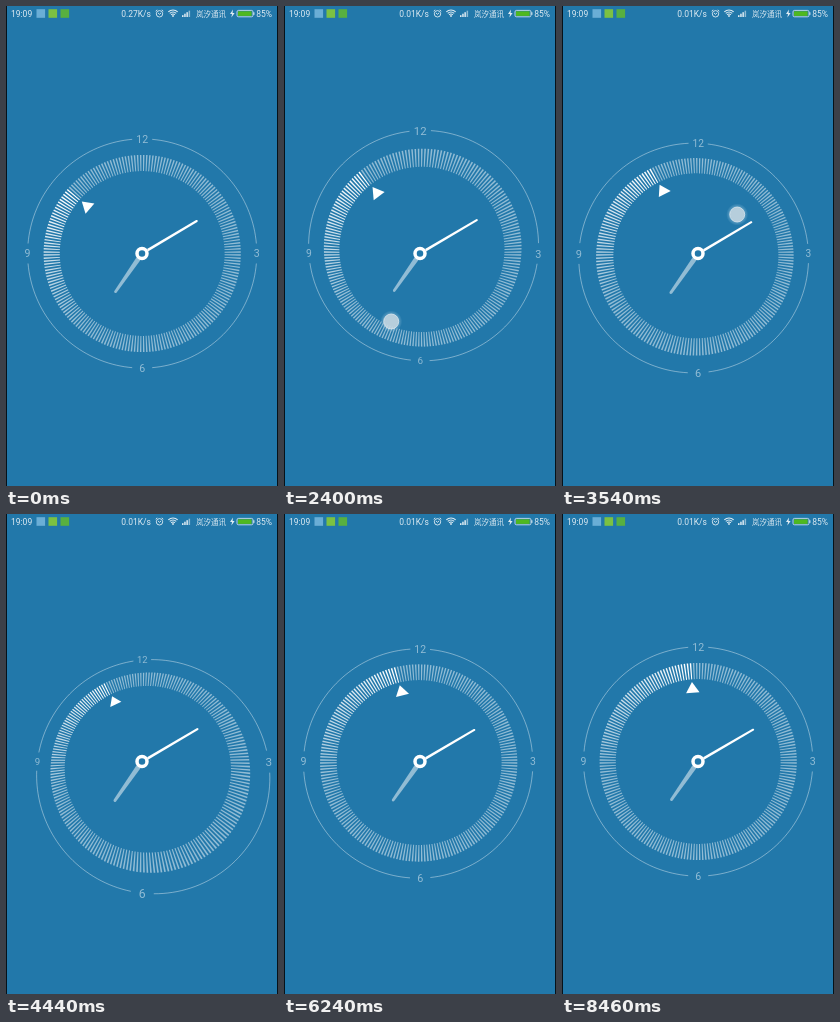
An HTML page with a canvas for the animation above (8520 ms loop, 272 px wide and 480 px high).

```html
<!DOCTYPE html>
<html lang="zh">
<head>
<meta charset="utf-8">
<title>Tilting clock</title>
<style>
  html, body { margin: 0; width: 100%; height: 100%; overflow: hidden; background: #2278aa; }
  canvas { display: block; width: 272px; height: 480px; }
</style>
</head>
<body>
<canvas id="stage"></canvas>
<script>
const W = 272, H = 480, LOOP = 8520, STEP = 60;
const CX = 136.2, CY = 247.5, R = 135, RAD = Math.PI / 180;
const BG = '#2278aa', LIGHT = '#fff', DIM = 'rgba(255,255,255,.5)';
const TILT = 8.8e-6;

const canvas = document.getElementById('stage');
const ctx = canvas.getContext('2d');
const dpr = window.devicePixelRatio || 1;
canvas.width = W * dpr;
canvas.height = H * dpr;
ctx.scale(dpr, dpr);

// [ms, degrees] of the second marker
const sweep = [[0, -49.3], [2400, -35.6], [3540, -29.3], [4440, -24.8],
  [5220, -20.5], [6240, -15], [LOOP, -4.2]];

// Finger paths: [ms, x, y] from the dial centre; released at the last point
const drags = [
  [[1950, -42, 52], [2400, -29, 68], [2900, 36, 20], [3260, 50, -75],
   [3540, 39, -39], [3900, 8, -70], [4440, -93, -128]],
  [[5100, -28, 36], [5220, -28, 34], [5500, -5, -105], [5750, 55, -55]]
];

function track(keys, t) {
  let i = 1;
  while (i < keys.length - 1 && t > keys[i][0]) i++;
  const a = keys[i - 1], b = keys[i];
  const p = Math.min(1, Math.max(0, (t - a[0]) / (b[0] - a[0])));
  return a.slice(1).map((v, k) => v + (b[k + 1] - v) * p);
}

// Damped swing back to rest, one second long
function spring(p) {
  const f = 0.571429;
  return p >= 1 ? 0 : -Math.pow(2, -2 * p) * Math.sin((p - f / 4) * 2 * Math.PI / f);
}

function pose(t) {
  let x = 0, y = 0, finger = null;
  for (const d of drags) {
    const end = d[d.length - 1][0];
    if (t < d[0][0]) continue;
    [x, y] = track(d, t);
    finger = t < end ? [CX + x, CY + y] : null;
    if (t >= end) {
      const k = spring((t - end) / 1000);
      x *= k;
      y *= k;
    }
  }
  return { kx: -x * TILT, ky: -y * TILT, finger };
}

let view;
function project(x, y) {
  const s = 1 / (1 - view.kx * x - view.ky * y);
  return [CX + x * s, CY + y * s, s];
}

// Point at an angle clockwise from twelve, with a sideways offset
function polar(deg, r, side = 0) {
  const s = Math.sin(deg * RAD), c = Math.cos(deg * RAD);
  return project(r * s + side * c, -r * c + side * s);
}

function trace(points) {
  ctx.beginPath();
  points.forEach(([x, y], i) => i ? ctx.lineTo(x, y) : ctx.moveTo(x, y));
}

function fill(points, color) {
  trace(points);
  ctx.closePath();
  ctx.fillStyle = color;
  ctx.fill();
}

function drawRim() {
  const r = 114.6;
  ctx.strokeStyle = DIM;
  ctx.lineWidth = 0.8;
  for (let q = 0; q < 4; q++) {
    const pts = [];
    for (let a = 5; a <= 85; a += 2) pts.push(polar(q * 90 + a, r));
    trace(pts);
    ctx.stroke();
  }
  ctx.fillStyle = DIM;
  ctx.font = '10.6px Roboto, sans-serif';
  ctx.textAlign = 'center';
  ctx.textBaseline = 'alphabetic';
  ['12', '3', '6', '9'].forEach((label, i) => {
    const [x, y, s] = polar(i * 90, r);
    ctx.save();
    ctx.translate(x, y);
    ctx.scale(s, s);
    ctx.fillText(label, 0, 3.9);
    ctx.restore();
  });
}

function drawTicks(sec) {
  const outer = 98.6, inner = 82.4, gap = 0.81;
  for (let i = 0; i < 200; i++) {
    const a = i * 1.8 + 0.9;
    const behind = ((sec - a) % 360 + 360) % 360;
    const alpha = 0.5 + 0.5 * Math.max(0, 1 - behind / 90);
    const ho = outer * 0.9 * RAD - gap, hi = inner * 0.9 * RAD - gap;
    fill([polar(a, outer, -ho), polar(a, outer, ho), polar(a, inner, hi), polar(a, inner, -hi)],
      `rgba(255,255,255,${alpha})`);
  }
}

function drawHand(deg, len, base, tip, color) {
  const pts = [polar(deg, 6.4, -base)];
  for (let a = -90; a <= 90; a += 30) {
    pts.push(polar(deg, len - tip + tip * Math.cos(a * RAD), tip * Math.sin(a * RAD)));
  }
  pts.push(polar(deg, 6.4, base));
  fill(pts, color);
}

function drawDial(sec) {
  drawRim();
  drawTicks(sec);
  fill([polar(sec, 79.7), polar(sec, 68.9, -6.75), polar(sec, 68.9, 6.75)], LIGHT);
  const minute = 54 + (sec + 360) / 60;
  drawHand(180 + 30 + minute / 12, 48, 2.4, 1.4, DIM);
  drawHand(minute, 64.5, 1.3, 1.05, LIGHT);
  ctx.strokeStyle = LIGHT;
  ctx.lineWidth = 3.5;
  disc(CX - 0.2, CY, 5);
  ctx.stroke();
}

function disc(x, y, r) {
  ctx.beginPath();
  ctx.arc(x, y, r, 0, 2 * Math.PI);
}

function drawFinger([x, y]) {
  const glow = ctx.createRadialGradient(x, y, 6, x, y, 11);
  glow.addColorStop(0, 'rgba(190,220,235,.5)');
  glow.addColorStop(1, 'rgba(190,220,235,0)');
  ctx.fillStyle = glow;
  disc(x, y, 11);
  ctx.fill();
  ctx.fillStyle = 'rgba(205,217,226,.75)';
  ctx.strokeStyle = 'rgba(235,242,246,.65)';
  ctx.lineWidth = 1;
  disc(x, y, 7.5);
  ctx.fill();
  ctx.stroke();
}

function label(text, x, align, size = 8.5) {
  ctx.font = `${size}px Roboto, "Noto Sans CJK SC", "Noto Sans CJK", sans-serif`;
  ctx.textAlign = align;
  ctx.fillText(text, x, 10.6);
}

function drawStatus(t) {
  const ink = 'rgba(255,255,255,.85)';
  ctx.fillStyle = ink;
  ctx.textBaseline = 'alphabetic';
  label('19:09', 5, 'left');
  label(t < 600 ? '0.27K/s' : '0.01K/s', 145, 'right');
  label('岚汐通讯', 190, 'left', 7.5);
  label('85%', 266, 'right');

  [['#6aaed6', 30.5], ['#7cc142', 42.5], ['#58b040', 54.5]].forEach(([color, x]) => {
    ctx.fillStyle = color;
    ctx.fillRect(x, 3.2, 8.6, 8.6);
  });

  // alarm
  ctx.strokeStyle = ink;
  ctx.lineWidth = 0.9;
  disc(153.5, 7.8, 3.2);
  ctx.stroke();
  trace([[152, 7], [153.5, 8.3], [155, 7]]);
  ctx.stroke();
  trace([[149.7, 5.2], [151.2, 3.8]]);
  ctx.stroke();
  trace([[155.8, 3.8], [157.3, 5.2]]);
  ctx.stroke();

  // wireless
  ctx.lineWidth = 1.1;
  for (const r of [2.6, 4.6, 6.6]) {
    ctx.beginPath();
    ctx.arc(167, 10.6, r, -135 * RAD, -45 * RAD);
    ctx.stroke();
  }
  ctx.fillStyle = ink;
  disc(167, 10, 0.9);
  ctx.fill();

  // signal
  for (let i = 0; i < 4; i++) {
    ctx.fillStyle = i < 3 ? ink : 'rgba(255,255,255,.5)';
    ctx.fillRect(176 + i * 2.2, 9.2 - i * 1.5, 1.5, 1.8 + i * 1.5);
  }

  // charging battery
  fill([[227, 3.6], [224, 8], [226, 8], [225.4, 11.4], [228.6, 6.9], [226.6, 6.9]], ink);
  ctx.strokeStyle = ink;
  ctx.lineWidth = 0.8;
  ctx.beginPath();
  ctx.roundRect(231, 4.4, 16, 6.4, 1.5);
  ctx.stroke();
  ctx.fillStyle = '#4fb81f';
  ctx.fillRect(232, 5.3, 13.6, 4.6);
  ctx.fillStyle = ink;
  ctx.fillRect(247.4, 6.3, 1, 2.6);
}

function draw(t) {
  view = pose(t);
  ctx.fillStyle = BG;
  ctx.fillRect(0, 0, W, H);
  drawDial(track(sweep, t)[0]);
  if (view.finger) drawFinger(view.finger);
  drawStatus(t);
  ctx.fillStyle = '#06121a';
  ctx.fillRect(0, 0, 1, H);
  ctx.fillRect(W - 1, 0, 1, H);
}

const start = performance.now();
function frame() {
  const t = (performance.now() - start) % LOOP;
  draw(Math.floor(t / STEP) * STEP);
  requestAnimationFrame(frame);
}
frame();
</script>
</body>
</html>
```
